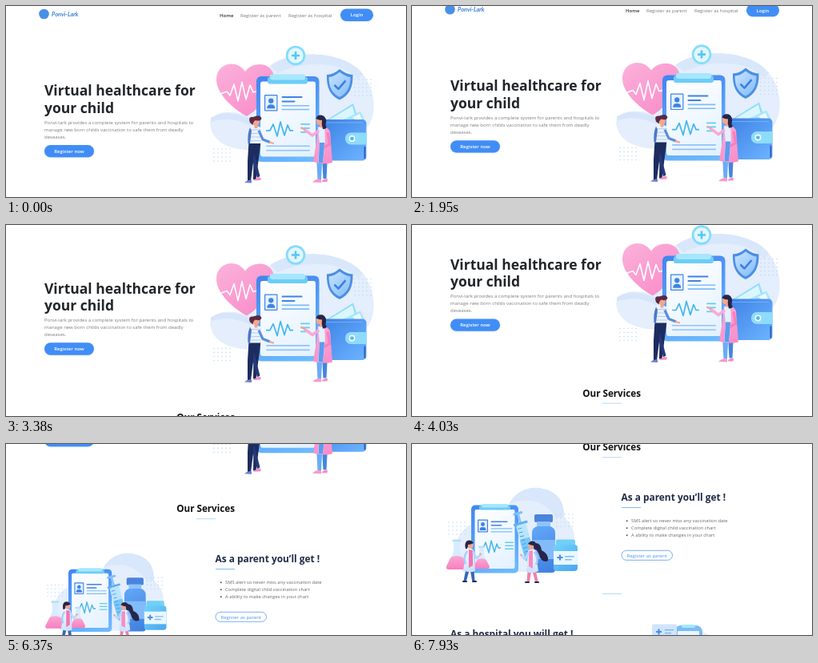
Animation, 500 px wide and 239 px high, one loop 8 s. Source, as an HTML page with a canvas:

```html
<!DOCTYPE html>
<html lang="en">
<head>
<meta charset="utf-8">
<title>Virtual healthcare</title>
<style>
html, body { margin: 0; width: 100%; height: 100%; overflow: hidden; background: #fff; }
canvas { display: block; width: 500px; height: 239px; }
</style>
</head>
<body>
<canvas id="stage"></canvas>
<script>
const W = 500, H = 239, LOOP = 8000, STEP = 130;
const canvas = document.getElementById('stage');
const ctx = canvas.getContext('2d');
const dpr = window.devicePixelRatio || 1;
canvas.width = W * dpr;
canvas.height = H * dpr;

const BLUE = '#418df6', DEEP = '#3f83e6', PALE = '#e4eefc';
const PINK = '#f98ac4', NAVY = '#1d2c5e', SKIN = '#f6a58c', HAIR = '#26264a';

// Page scroll: [ms, px]
const SCROLL = [[0, 0], [910, 0], [1300, 7], [1820, 7.5], [2400, 0], [2800, 0],
  [4030, 56.5], [5330, 122], [6370, 186], [7930, 263]];

function scrollAt(t) {
  for (let i = 1; i < SCROLL.length; i++) {
    const [t0, a] = SCROLL[i - 1], [t1, b] = SCROLL[i];
    if (t <= t1) return a + (b - a) * (t - t0) / (t1 - t0);
  }
  return SCROLL[SCROLL.length - 1][1];
}

// 0..1..0 over three seconds, lowest at t = low
const wave = (t, low) => (1 - Math.cos(2 * Math.PI * (t - low) / 3000)) / 2;

function grad(x0, y0, x1, y1, a, b) {
  const g = ctx.createLinearGradient(x0, y0, x1, y1);
  g.addColorStop(0, a);
  g.addColorStop(1, b);
  return g;
}
function fill(d, color) {
  ctx.fillStyle = color;
  ctx.fill(new Path2D(d));
}
function line(d, color, width = 1) {
  ctx.strokeStyle = color;
  ctx.lineWidth = width;
  ctx.stroke(new Path2D(d));
}
function box(x, y, w, h, r, color) {
  ctx.fillStyle = color;
  ctx.beginPath();
  ctx.roundRect(x, y, w, h, r);
  ctx.fill();
}
function disc(x, y, r, color, ry = r) {
  ctx.fillStyle = color;
  ctx.beginPath();
  ctx.ellipse(x, y, r, ry, 0, 0, 7);
  ctx.fill();
}
function dots(x, y, cols, rows, gap = 5) {
  for (let i = 0; i < cols * rows; i++)
    disc(x + (i % cols) * gap, y + Math.floor(i / cols) * gap, 0.75, '#bcd6f8');
}
function text(s, x, y, size, color, weight = 400, align = 'left') {
  ctx.font = `${weight} ${size}px "Open Sans", "Noto Sans", sans-serif`;
  ctx.textAlign = align;
  ctx.fillStyle = color;
  ctx.fillText(s, x, y);
}
function plus(x, y, r, color, w) {
  line(`M${x - r} ${y}h${2 * r}M${x} ${y - r}v${2 * r}`, color, w);
}

function pill(label, x, y, w, h) {
  ctx.save();
  ctx.shadowColor = 'rgba(65,141,246,.25)';
  ctx.shadowBlur = 2 * dpr;
  ctx.shadowOffsetY = 0.5 * dpr;
  box(x, y, w, h, h / 2, BLUE);
  ctx.restore();
  text(label, x + w / 2, y + h / 2 + 2.1, 6, '#fff', 600, 'center');
}

function drawNav() {
  disc(47.5, 10, 6.3, '#4a8fe6');
  ctx.font = 'italic 700 7.4px Lato, "Open Sans", sans-serif';
  ctx.textAlign = 'left';
  ctx.fillStyle = '#3b7fd6';
  ctx.fillText('Ponvi-Lark', 57, 12.8);
  text('Home', 267, 13.5, 6, '#333', 600);
  text('Register as parent', 293, 13.5, 6, '#777');
  text('Register as hospital', 353, 13.5, 6, '#777');
  pill('Login', 418, 3.5, 41, 15.5);
}

function drawIntro() {
  text('Virtual healthcare for', 48, 112.2, 17.5, '#212529', 700);
  text('your child', 48, 133.7, 17.5, '#212529', 700);
  ['Ponvi-lark provides a complete system for parents and hospitals to',
   'manage new born childs vaccination to safe them from deadly',
   'deseases.'].forEach((s, i) => text(s, 48, 147.6 + i * 9, 6, '#7c7c7c'));
  pill('Register now', 48, 174, 62, 15.3);
}

function drawServices() {
  text('Our Services', 249.6, 271.4, 11.7, '#111', 700, 'center');
  box(238, 279.2, 24, 1, 0, '#b5d9fb');
  text('As a parent you\u2019ll get !', 261.5, 334, 11.9, '#1f2b48', 700);
  box(262, 342, 24, 1, 0, '#86bbf3');
  ['SMS alert so never miss any vaccination date',
   'Complete digital child vaccination chart',
   'A ability to make changes in your chart'].forEach((s, i) => {
    disc(268.7, 359.3 + i * 9, 1, '#555');
    text(s, 274, 361.2 + i * 9, 5.8, '#666');
  });
  ctx.strokeStyle = '#6ba5ef';
  ctx.lineWidth = 0.9;
  ctx.beginPath();
  ctx.roundRect(262, 396.3, 63.5, 12, 6);
  ctx.stroke();
  text('Register as parent', 293.7, 404.5, 6, '#4a90ee', 400, 'center');
  box(238, 450, 24, 1, 0, '#b5d9fb');
  text('As a hospital you will get !', 48, 504.5, 11.9, '#1f2b48', 700);
}

function portrait(x, y, w, h) {
  box(x, y, w, h, 1, DEEP);
  box(x + 1.2, y + 1.2, w - 2.4, h - 2.4, 0.5, '#e6f2ff');
  disc(x + w / 2, y + h * 0.38, w * 0.19, DEEP);
  box(x + w * 0.2, y + h * 0.6, w * 0.6, h * 0.24, [w * 0.25, w * 0.25, 0, 0], DEEP);
}

function drawHeroArt() {
  fill('M256 153C251 133 276 130 296 135C310 128 312 92 330 75C358 53 424 56 446 85C462 106 464 134 452 152C438 174 410 180 380 180H300C274 178 260 168 256 153Z', PALE);
  fill('M256 140Q276 128 306 141V150Q280 136 256 145Z', '#d6e5fa');
  fill('M330 75C358 53 424 56 446 85L440 92C420 68 370 68 340 84Z', '#d9e7fb');
  dots(436, 92, 5, 5);
  dots(260, 179, 5, 4);

  fill('M301 138C286 130 262 110 263 91C264 71 288 66 299 82C309 68 335 70 335 91C334 111 314 130 301 138Z', grad(270, 72, 315, 136, '#fbb0da', '#f98fca'));
  line('M268 110L276 107L280 112L285 98L290 119L295 95L300 117L305 99L309 108L316 106', '#fff', 1.6);

  disc(362, 62, 12.3, '#83dcfb');
  disc(362, 62, 9.6, '#e2f6ff');
  plus(362, 62, 5, '#57c6f5', 2.6);

  fill('M417 79Q426 86 433.5 86C434 102 429 112 417 117.5C405 112 400.5 102 401 86Q409 86 417 79Z', '#4a8fe6');
  fill('M417 82.8Q425 88.5 430.6 89C430.6 102 426 109.5 417 114C408 109.5 403.5 102 403.6 89Q410 88.5 417 82.8Z', grad(404, 84, 430, 112, '#c4e2ff', '#86bdf9'));
  line('M410.5 99L415.5 104L424.5 93.5', '#3d80df', 2.6);

  // Notes and wallet
  fill('M397 145L434 122L442 146L410 158Z', '#8fdefb');
  fill('M403 143L433 125L438 144L412 154Z', '#dcf6ff');
  fill('M411 147L443 132L451 148L420 160Z', '#a9e6fb');
  fill('M416 148L442 135L447 147L422 158Z', '#eefaff');
  disc(432, 144, 4, '#9be0fa');
  box(383, 142, 67.5, 51.5, 5, grad(392, 142, 440, 194, '#3c7fe2', '#69b0ff'));
  line('M448.5 176V191', '#2f5fb4', 2);
  line('M400 146H446', '#7db6fa', 0.8);
  box(424, 158.5, 27, 15, [7, 2, 2, 7], '#8edcfc');
  disc(432.5, 166, 4, '#fff');
  disc(432.5, 166, 2.4, '#51b9f1');

  // Clipboard
  box(313, 88, 78.5, 107, 6, grad(330, 88, 370, 195, '#4287f0', '#6cbaff'));
  box(318, 94.5, 69, 94, 3, grad(320, 95, 380, 188, '#fff', '#e3f1ff'));
  box(327, 88.5, 50, 9, 3, '#6ccdf8');
  box(330, 85.5, 44, 7, 3, '#a6e7fd');
  portrait(323, 111, 16.5, 20.5);
  box(344.5, 113, 26, 2, 1, DEEP);
  box(344.5, 118.5, 17, 2, 1, DEEP);
  box(344.5, 124, 35, 1.6, 1, '#7ebcf7');
  box(344.5, 128.8, 35, 1.6, 1, '#7ebcf7');
  line('M325 156H330L334 148L339 163L343 145L348 162L352 149L355 156H359', '#45b6ef', 1.7);
  for (let i = 0; i < 3; i++) box(368, 147 + i * 5, 12, 1.7, 1, '#62cdf3');
  box(325, 174.5, 55, 1.6, 1, '#8fc4f8');
  box(325, 180, 55, 1.6, 1, '#8fc4f8');

  drawMan();
  drawWoman();
}

function drawMan() {
  fill('M303.5 170H318.5L316 190L312.5 217H309L309.5 192L306 219H302L302 194Z', NAVY);
  fill('M310 184L317.5 213L314 215L308.5 194Z', '#26397a');
  fill('M298 221Q302 217 307 218V221.5Z', '#6e7fd0');
  fill('M309 218.5Q314 214 318.5 214.5V218Z', PINK);
  fill('M305 151Q313 148.5 318.5 152L319 172H303Z', '#eaf2ff');
  for (let i = 0; i < 4; i++) line(`M306 ${155 + i * 4.5}H318.5`, '#a5c3ee', 0.8);
  fill('M305 152Q301.5 160 302.5 172H305L307 156Z', '#4a78c8');
  line('M316 156L321 167L330 170.5', '#5b8edb', 3.2);
  line('M329 170.5L335 172', SKIN, 2.2);
  box(310.5, 147, 4, 6, 1, SKIN);
  disc(312.5, 145, 4.4, SKIN, 5);
  fill('M305 146Q302 138 309 139Q318 135 319.5 141Q318 145 312 143Q309 144 308.5 149Z', '#5a2a42');
}

function drawWoman() {
  fill('M388 188H395.5L394 217H389.5Z', '#6aabf6');
  fill('M395 188H402L400.5 216H396.5Z', '#4484de');
  fill('M383 220.5Q388 215.5 394 217V221Z', '#f59bc8');
  fill('M394.5 220Q397 215.5 402 216.5L401.5 220Z', PINK);
  fill('M390 151Q401 149 405 157L408 196Q396 199 384 195L388 170Z', grad(386, 152, 406, 198, '#fbaad6', '#f98cc8'));
  fill('M390 152L398 151L399 172L396 196H390L392 172Z', '#e2f0ff');
  fill('M392 171H398.5L396 196H390.5Z', '#5a9cf0');
  line('M391 156L383 162L373 154.5', '#fba9d5', 3.6);
  line('M374 155L368.5 152', SKIN, 2.2);
  line('M402 158L404.5 173L397 177', '#f77fbd', 3.2);
  box(392, 146, 4, 6, 1, SKIN);
  disc(392, 144, 4.3, SKIN, 5);
  fill('M387.5 141Q389 135.5 396 137Q402 140 399.5 149Q403 154 396 154Q394 148 395 143Q391 143 387.5 141Z', HAIR);
}

// Small figure: head at the top, reaching towards +x
function scientist(x, y, dir, top, legs) {
  ctx.save();
  ctx.translate(x, y);
  ctx.scale(dir, 1);
  fill('M-4 28H1L-4 46H-7.5ZM0 28H5L6.5 46H3Z', legs);
  box(-9, 46, 6, 2, 1, NAVY);
  box(3, 46, 6, 2, 1, NAVY);
  fill('M-4 7Q2 4 5 8L7 34Q0 37 -8 33Z', grad(-6, 8, 6, 34, '#f2f8ff', '#c7e0fb'));
  fill('M-1 7L4 8L4 27L-1 30Z', top);
  line('M-3 9Q-9 18 -5 25', '#a9cdf6', 2.6);
  line('M4 10L9 18L13 14', '#b9d7f9', 2.6);
  disc(13.5, 13, 1.4, SKIN);
  disc(1, 1.5, 3.6, SKIN, 4.2);
  fill('M5 -1Q2 -6 -3 -4Q-7 -1 -5 6Q-2 7 -2 1Q1 1 5 -1Z', HAIR);
  ctx.restore();
}

function flask(x, y, s) {
  ctx.save();
  ctx.translate(x, y);
  ctx.scale(s, s);
  fill('M-4 -36H4V-22L13 -4Q14 0 10 0H-10Q-14 0 -13 -4L-4 -22Z', '#d7ecff');
  fill('M-7.5 -15Q0 -19 7.5 -15L13 -4Q14 0 10 0H-10Q-14 0 -13 -4Z', grad(0, -17, 0, 0, '#fba6d2', '#f77fbf'));
  box(-5.5, -37.5, 11, 2.6, 1, '#b5def9');
  ctx.restore();
}

function drawParentArt() {
  fill('M118 90C119 62 144 51 164 56C188 62 191 80 190 92C205 104 207 122 196 138L150 160H64C48 145 50 112 75 100Z', PALE);
  fill('M122 74Q160 62 180 92H190Q191 62 164 56Q138 50 122 74Z', '#d8e7fb');
  dots(46, 98, 5, 4);
  dots(181, 88, 5, 4);
  flask(56, 157, 1);

  box(74, 76.5, 59, 85, 5, grad(85, 76, 120, 161, '#4287f0', '#6cbaff'));
  box(78.5, 82, 50, 74, 2, grad(80, 82, 128, 156, '#fff', '#e3f1ff'));
  box(84, 77, 39, 5.5, 2, '#6ccdf8');
  box(87, 75, 33, 4.5, 2, '#a6e7fd');
  portrait(82, 94.5, 13, 16);
  box(98.5, 96.5, 21, 1.6, 1, DEEP);
  box(98.5, 101, 14, 1.6, 1, DEEP);
  box(98.5, 105.2, 27, 1.3, 1, '#7ebcf7');
  box(98.5, 109.2, 27, 1.3, 1, '#7ebcf7');
  line('M85 130H89L92 123L96 136L99 121L103 135L106 125L108 130H111', '#45b6ef', 1.5);
  for (let i = 0; i < 3; i++) box(116, 122.5 + i * 4, 11, 1.4, 1, '#62cdf3');
  flask(87, 156, 0.75);

  // Large bottle
  box(153, 88, 23, 10, 2, '#4a84dc');
  box(156, 97, 17, 9, 0, '#8cc4fa');
  box(150, 103, 29, 58, [8, 8, 4, 4], grad(150, 103, 179, 161, '#62a8f8', '#3f7fe0'));
  box(150, 120, 29, 24, 0, '#83bbf8');

  // Syringe
  ctx.save();
  ctx.translate(142, 122);
  ctx.rotate(-0.27);
  box(-1.5, -38, 3, 18, 0, '#8cc5f8');
  box(-6, -38, 12, 3, 1, '#7cc0f8');
  box(-9, -25, 18, 3, 1, '#62aef5');
  box(-6.5, -22, 13, 46, 2, '#b9e6fd');
  box(-6.5, -4, 13, 28, 2, '#78c8f8');
  for (let i = 0; i < 8; i++) box(-5, -18 + i * 5, 5, 0.9, 0, '#4a94e6');
  box(-2.5, 24, 5, 6, 1, '#4a94e6');
  box(-0.5, 30, 1, 10, 0, '#7fa9dc');
  ctx.restore();

  // Small jar
  box(180, 119.5, 24, 8, 2, '#6fd0f8');
  box(177, 126, 30, 33, 4, grad(177, 126, 207, 159, '#74d2fa', '#48a6f2'));
  box(177, 134, 30, 17, 0, '#e9f7ff');
  plus(185, 142, 3.6, '#4a8fe6', 2.2);
  box(191, 140, 12, 1.4, 1, '#7ebcf7');
  box(191, 144, 9, 1.4, 1, '#7ebcf7');

  scientist(72, 125, 1, '#f573b4', '#3b66b8');
  fill('M153 124Q161 123 162 133Q171 137 170 146Q164 149 160 142Q158 134 153 130Z', HAIR);
  scientist(150, 126, -1, PINK, '#f27fae');
}

function drawHospitalArt() {
  disc(350, 512, 27, PALE, 16);
  box(328, 490, 35, 30, [8, 8, 3, 3], '#7cbcf7');
  box(332, 497, 27, 24, 1, '#eaf5ff');
  box(337, 489, 17, 4, 2, '#a6e7fd');
  box(300, 488.5, 31, 28, 2, '#cfe5fb');
  plus(308.5, 498, 3.5, '#4a90ea', 2.2);
  box(316, 495, 11, 1.4, 0, '#7fb5f5');
  box(316, 499, 8, 1.4, 0, '#7fb5f5');
}

function draw(t) {
  ctx.setTransform(dpr, 0, 0, dpr, 0, 0);
  ctx.fillStyle = '#fff';
  ctx.fillRect(0, 0, W, H);
  ctx.lineJoin = 'round';
  ctx.translate(0, -scrollAt(t));
  drawNav();
  drawIntro();
  drawServices();
  drawHospitalArt();

  ctx.save();
  ctx.translate(0, 8 * wave(t, -200) - 0.4);
  drawHeroArt();
  ctx.restore();

  const k = (1 + 0.086 * wave(t, 6350)) / 1.086;
  ctx.save();
  ctx.translate(124.5, 380);
  ctx.scale(k, k);
  ctx.translate(-124.5, -117);
  drawParentArt();
  ctx.restore();
}

let start = null;
function tick(now) {
  if (start === null) start = now;
  const t = (now - start) % LOOP;
  draw(Math.floor(t / STEP) * STEP);
  requestAnimationFrame(tick);
}
draw(0);
requestAnimationFrame(tick);
</script>
</body>
</html>
```
